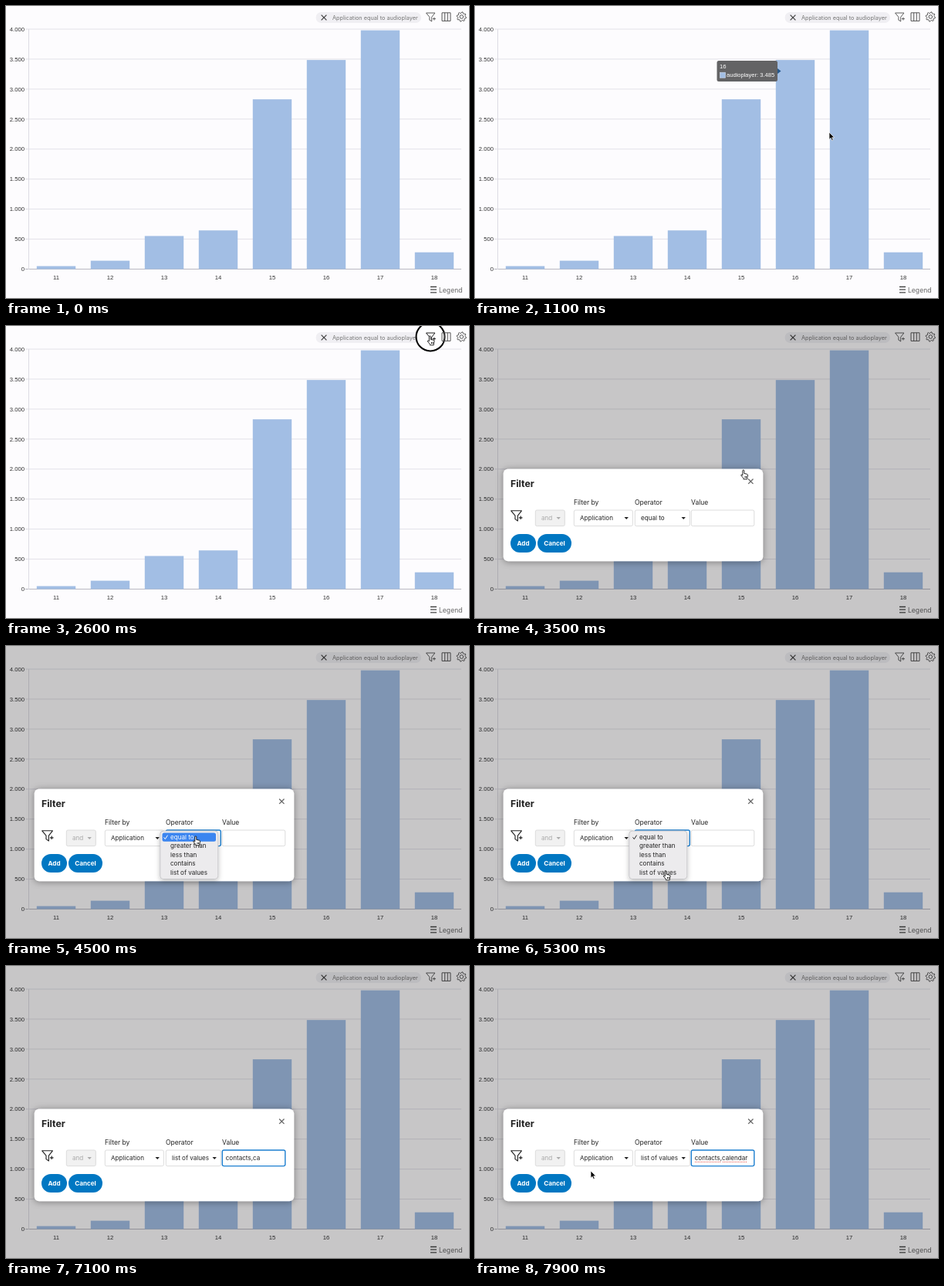
An HTML page for the animation above (8000 ms loop, 600x379 px).

```html
<!DOCTYPE html>
<html lang="en">
<head>
<meta charset="utf-8">
<title>Chart filter</title>
<style>
html, body { margin: 0; width: 100%; height: 100%; overflow: hidden; background: #fdfcfe; }
svg { display: block; width: 600px; height: 379px; font-family: Inter, "Open Sans", sans-serif; }
.chart { font: 7.7px "Liberation Sans", Arial, sans-serif; fill: #333; }
.form { font-size: 8.1px; fill: #222; }
.line { fill: none; stroke: #555; stroke-width: 1; stroke-linejoin: round; }
</style>
</head>
<body>
<svg id="stage" viewBox="0 0 600 379"></svg>
<script>
const LOOP = 8000, STEP = 100;
const values = [50, 140, 552, 645, 2830, 3485, 3980, 280];
const options = ['equal to', 'greater than', 'less than', 'contains', 'list of values'];
const typed = 'contacts,calendar';
const yOf = v => 341.5 - v * 311.5 / 4000;
const dotted = v => v < 1000 ? String(v) : (v / 1000).toFixed(3);

const text = (x, y, s, attrs = '') => `<text x="${x}" y="${y}" ${attrs}>${s}</text>`;
const rect = (x, y, w, h, fill, attrs = '') =>
  `<rect x="${x}" y="${y}" width="${w}" height="${h}" fill="${fill}" ${attrs}/>`;
const path = (d, attrs = 'class="line"') => `<path d="${d}" ${attrs}/>`;
const cross = (x, y, r, color) =>
  path(`M${x - r} ${y - r}l${2 * r} ${2 * r}m0 ${-2 * r}l${-2 * r} ${2 * r}`,
    `stroke="${color}" stroke-width="1.3" fill="none"`);

// Linear interpolation over rows of [time, x, y, label]; the label holds until the next row
function along(keys, t) {
  const i = keys.findLastIndex(k => k[0] <= t);
  if (i < 0) return null;
  const a = keys[i], b = keys[i + 1];
  if (!a[3]) return null;
  if (!b || !b[3]) return { x: a[1], y: a[2], label: a[3] };
  const p = (t - a[0]) / (b[0] - a[0]);
  return { x: a[1] + (b[1] - a[1]) * p, y: a[2] + (b[2] - a[2]) * p, label: a[3] };
}

const pointerKeys = [
  [900, 385, 290, 'arrow'], [1000, 425, 215, 'arrow'], [1100, 459, 164, 'arrow'],
  [1300, 495, 150, 'arrow'], [1500, 530, 180, 'arrow'], [1700, 528, 190, 'arrow'],
  [1900, 490, 130, 'arrow'], [2000, 440, 70, 'arrow'], [2200, 520, 30, 'arrow'],
  [2300, 549.5, 13, 'hand'], [3200, 549.5, 13, 'hand'], [3400, 420, 126, 'hand'],
  [3500, 348, 187, 'hand'], [3700, 300, 226, 'hand'], [4100, 250, 245, 'hand'],
  [4300, 246, 245, 'hand'], [4500, 246, 247, 'hand'], [5200, 247.5, 292, 'hand'],
  [5400, 247.5, 292, 'hand'], [5900, 283, 258, 'beam'], [6100, 292.5, 251, 'beam'],
  [6800, 0, 0, ''], [7600, 285, 251, 'arrow'], [7700, 240, 254, 'arrow'], [7900, 150, 266, 'arrow']
];

// x is the right edge of the box, the label is the hovered category
const tipKeys = [
  [900, 341, 118, 15], [1000, 366, 100, 16], [1100, 392, 71, 16], [1200, 425, 52, 17],
  [1300, 462, 32, 17], [1400, 495, 170, 18], [1500, 532, 315, 18], [1700, 532, 315, 18],
  [1800, 500, 180, 17], [1900, 462, 32, 17], [2000, 430, 50, 16], [2100, 399, 68, 16], [2200, 0, 0, 0]
];

const shapes = {
  arrow: path('M0 0v9.2l2.1-1.9 1.5 3.3 1.6-.7-1.5-3.2h2.9z', 'fill="#000" stroke="#fff" stroke-width=".7"'),
  hand: path('M-1.2 1q0-1.1 1-1.1t1 1.1v3.4l3.6.8q1.4.4 1.1 1.9l-.7 3v1.7h-4.9v-1.2l-3-3.5q-.5-1.3.9-1l1 .8zM2 8v2m1.6-2v2',
    'fill="#fff" stroke="#111" stroke-width=".9" stroke-linejoin="round"'),
  beam: path('M-2.5-6q2.5 0 2.5 1.5q0-1.5 2.5-1.5M0-4.5v9M-2.5 6q2.5 0 2.5-1.5q0 1.5 2.5 1.5M-1.2 1.5h2.4',
    'fill="none" stroke="#111" stroke-width="1"')
};

const funnel = (x, y, k, color) => `<g transform="translate(${x} ${y}) scale(${k})">` +
  path('M0 0h12L7.6 5.6v6L4.6 9.6v-4zM9 8h4m-2-2v4', `fill="none" stroke="${color}" stroke-linejoin="round"`) + '</g>';

function gear(cx, cy) {
  const points = [];
  for (let i = 0; i < 32; i++) {
    const r = i % 4 < 2 ? 6.2 : 4.7, a = (i + .5) * Math.PI / 16;
    points.push((cx + r * Math.cos(a)).toFixed(1) + ' ' + (cy + r * Math.sin(a)).toFixed(1));
  }
  return path(`M${points.join('L')}Z`) + `<circle cx="${cx}" cy="${cy}" r="2.3" class="line"/>`;
}

function chart() {
  let s = '';
  for (let v = 0; v <= 4000; v += 500) {
    const y = yOf(v);
    s += path(`M25 ${y}H590`, `stroke="${v ? '#e2e1e8' : '#b9b9c2'}"`) +
      text(24, y + 2.7, dotted(v), 'text-anchor="end"');
  }
  s += path('M29.5 30V342', 'stroke="#dddce4"');
  values.forEach((v, i) => {
    const x = 65 + 70 * i;
    s += rect(x - 25.2, yOf(v), 50.4, 341.5 - yOf(v), '#a2bee4') +
      text(x, 355, 11 + i, 'text-anchor="middle"');
  });
  return `<g class="chart">${s}</g>` +
    path('M550 364.5h8m-8 3.7h8m-8 3.7h8', 'stroke="#444" stroke-width="1.3"') +
    text(561, 371.5, 'Legend', 'font-size="8.6" fill="#666"');
}

function toolbar(clicked) {
  return rect(401.5, 8, 136.5, 14, '#f0eff3', 'rx="7"') + cross(412, 15, 3.4, '#444') +
    text(423, 17.7, 'Application equal to audioplayer', 'font-size="7.3" fill="#777"') +
    (clicked ? '<circle cx="550" cy="14" r="18.5" fill="#fff" fill-opacity=".8" stroke="#000" stroke-width="2"/>' : '') +
    funnel(544.5, 9, .95, clicked ? '#111' : '#555') +
    path('M565 8.8h11v10.6h-11zM568.7 8.8v10.6m3.6-10.6v10.6') + gear(590.3, 14);
}

function tooltip({ x, y, label }) {
  const value = values[label - 11], w = value < 1000 ? 72.5 : 78.5, left = x - w;
  return `<g class="chart" font-size="7.55">` +
    path(`M${x} ${y + 10}l4.5 3.5-4.5 3.5z`, 'fill="#25588c"') +
    rect(left, y, w, 27, '#636365', 'rx="2.5"') +
    text(left + 3.5, y + 9.5, label, 'style="fill:#fff"') +
    rect(left + 4, y + 15.2, 7, 7, '#a2bee4', 'stroke="#d5e0f0" stroke-width=".6"') +
    text(left + 12.5, y + 21.2, 'audioplayer: ' + dotted(value), 'style="fill:#fff;font-size:7.55px"') + '</g>';
}

function field(x, w, label, { focus, off, caret = true } = {}) {
  const color = off ? '#aaa' : '#222';
  return rect(x + .3, 239, w, 20.6, off ? '#f1f1f1' : '#fff',
      `rx="2" stroke="${focus ? '#1d7fd0' : '#dcdcdc'}" stroke-width="${focus ? 1.4 : 1}"`) +
    text(x + 8, 252.3, label, `fill="${color}"`) +
    (caret ? path(`M${x + w - 10.5} 248h5.4l-2.7 3z`, `fill="${color}"`) : '');
}

const button = (x, w, label) => rect(x, 270, w, 24, '#0077c2', 'rx="12"') +
  text(x + w / 2, 285, label, 'text-anchor="middle" font-weight="700" style="fill:#fff"');

function menu(hover) {
  return rect(199.8, 240, 75, 62.5, '#ecebed', 'rx="4" stroke="#b9b9bc" stroke-width=".7" filter="url(#soft)"') +
    options.map((o, i) => (i === hover ? rect(202.5, 242.6 + 11.4 * i, 69.5, 11.2, '#3b85f0', 'rx="2.5"') : '') +
      text(213, 251 + 11.4 * i, o, i === hover ? 'style="fill:#fff"' : '')).join('') +
    path('M204.5 248.3l1.8 2.3 3.2-5', `fill="none" stroke="${hover === 0 ? '#fff' : '#222'}"`);
}

function dialog(t, pointer) {
  const count = t < 7000 ? 0 : t < 7100 ? 4 : t < 7200 ? 11 : typed.length;
  let s = rect(36.8, 185.5, 336.4, 119.7, '#fff', 'rx="6" filter="url(#shadow)"') +
    text(46, 209, 'Filter', 'font-size="12.3" font-weight="700"') + cross(357.3, 201.7, 3.2, '#666') +
    [[128, 'Filter by'], [207, 'Operator'], [280, 'Value']].map(([x, l]) => text(x, 232, l, 'font-size="8.5"')).join('') +
    funnel(46.8, 239.8, 1.13, '#222') +
    field(78, 38, 'and', { off: true }) + field(128, 76, 'Application') +
    field(207, 71, options[t < 5400 ? 0 : 4], { focus: t >= 4300 && t < 6500 }) +
    field(280, 81.5, '', { focus: t >= 6300, caret: false }) +
    text(284.7, 252.3, typed.slice(0, count)) + button(46, 33, 'Add') + button(81, 44, 'Cancel');
  if (t >= 7600) s += path('M285 254.3h33m3 0h32', 'stroke="#e0483e" stroke-width="1" stroke-dasharray="1 1"');
  if (t >= 4500 && t < 5400)
    s += menu(t < 5300 ? Math.max(0, Math.min(4, Math.floor((pointer.y - 242.6) / 11.4))) : -1);
  return `<g class="form">${s}</g>`;
}

const defs = `<defs>
  <filter id="shadow" x="-10%" y="-25%" width="120%" height="150%"><feDropShadow dx="0" dy="1" stdDeviation="5" flood-opacity=".38"/></filter>
  <filter id="soft" x="-20%" y="-20%" width="140%" height="140%"><feDropShadow dx="0" dy="2" stdDeviation="3" flood-opacity=".25"/></filter>
</defs>`;
const stage = document.getElementById('stage'), backdrop = chart();

function draw(t) {
  const pointer = along(pointerKeys, t), tip = along(tipKeys, t);
  const fade = Math.max(0, Math.min(1, (t - 2600) / 200));
  stage.innerHTML = defs + backdrop + toolbar(t >= 2600 && t < 2800) + (tip ? tooltip(tip) : '') +
    (fade ? `<g opacity="${fade}">${rect(0, 0, 600, 379, '#000', 'opacity=".215"')}${dialog(t, pointer)}</g>` : '') +
    (pointer ? `<g transform="translate(${pointer.x} ${pointer.y})">${shapes[pointer.label]}</g>` : '');
}

let last = -1;
function tick() {
  const t = Math.floor(performance.now() % LOOP / STEP) * STEP;
  if (t !== last) draw(last = t);
  requestAnimationFrame(tick);
}
tick();
</script>
</body>
</html>
```
